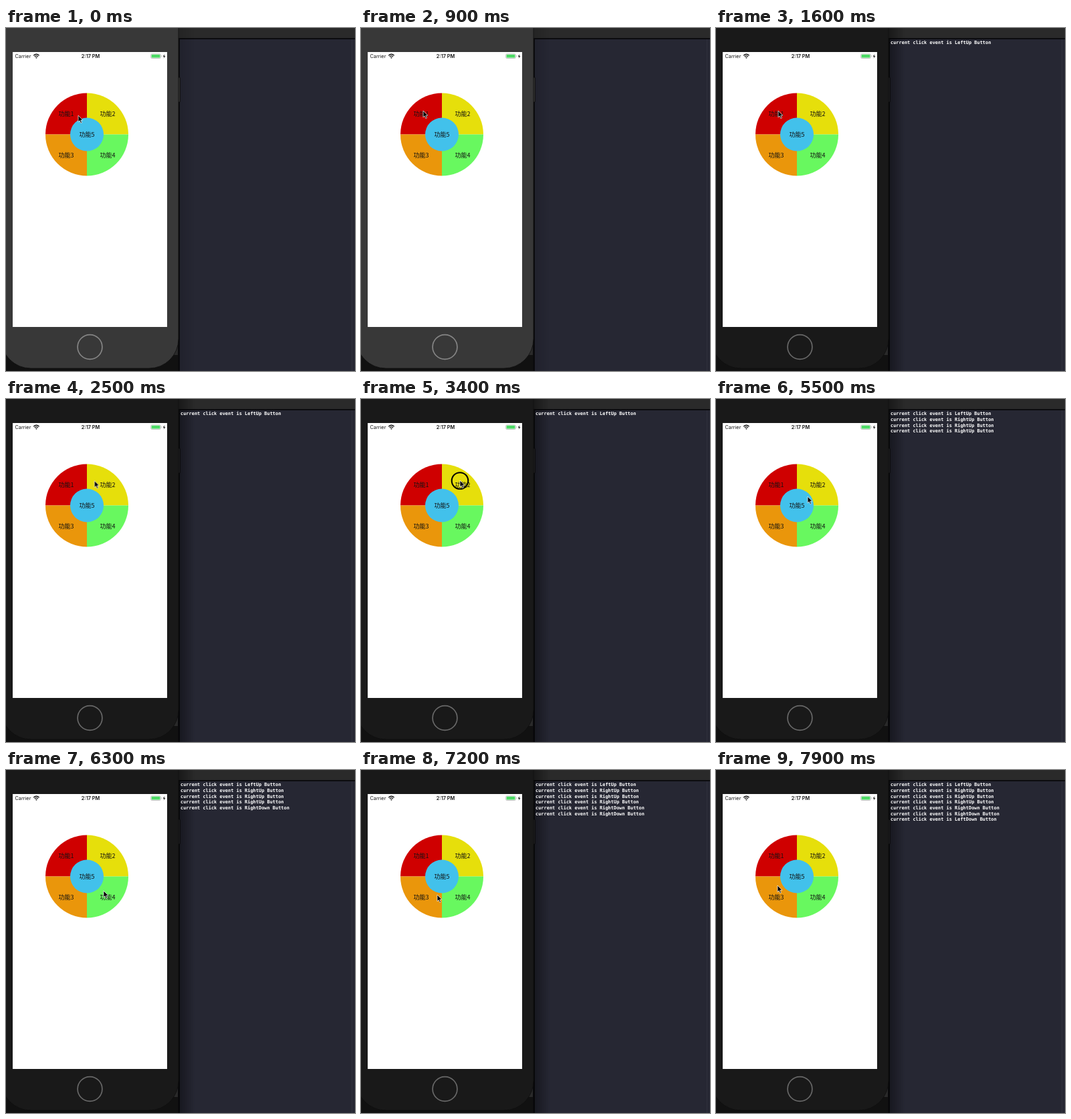
An HTML page that plays this animation: 522 px wide and 514 px high, repeating every 8 s.

```html
<!DOCTYPE html>
<html lang="zh-CN">
<head>
<meta charset="utf-8">
<title>Pie menu clicks</title>
<style>
  html, body { margin: 0; width: 100%; height: 100%; overflow: hidden; background: #262626; }
  svg { display: block; width: 522px; height: 514px; }

  .body, .button, .home, .shade, #visible rect, #ring { animation: 8s step-end infinite; }
  .body { animation-name: body; }
  .button { animation-name: button; }
  .home { animation-name: home; fill: none; stroke-width: 1.7px; }
  .shade { animation-name: shade; }
  #visible rect { animation-name: log; }
  #ring { animation-name: press; fill: none; stroke: #000; stroke-width: 2px; }
  #pointer { animation: move 8s linear infinite; }

  .status { font: 7.3px Inter, Roboto, sans-serif; fill: #111; }
  .labels { font: 9px "Noto Sans CJK SC", "Noto Sans CJK", sans-serif; text-anchor: middle; fill: #111; }
  .console { font: bold 6.95px "DejaVu Sans Mono", "Liberation Mono", monospace; fill: #fff; }

  /* The simulator window gains focus with the first click. */
  @keyframes body { 0% { fill: #383838; } 18.7%, 100% { fill: #191919; } }
  @keyframes button { 0% { fill: #303030; } 18.7%, 100% { fill: #1b1b1d; } }
  @keyframes home { 0% { stroke: #858585; } 18.7%, 100% { stroke: #686868; } }
  @keyframes shade { 0% { opacity: .35; } 18.7%, 100% { opacity: 1; } }

  @keyframes log {
    0% { transform: translateY(0); }
    19.9% { transform: translateY(8.67px); }
    44.9% { transform: translateY(17.34px); }
    59.9% { transform: translateY(26.01px); }
    66.2% { transform: translateY(34.68px); }
    77.4% { transform: translateY(43.35px); }
    86.2% { transform: translateY(52.02px); }
    94.9%, 100% { transform: translateY(60.69px); }
  }
  @keyframes press {
    0%, 19.9%, 46.2%, 61.2%, 67.4%, 78.7%, 87.4%, 96.2%, 100% { opacity: 0; }
    18.7%, 42.4%, 58.7%, 64.9%, 76.2%, 84.9%, 93.7% { opacity: 1; }
  }
  @keyframes move {
    0%, 1.25% { transform: translate(108px, 131px); }
    11.25%, 25% { transform: translate(93px, 124px); }
    33.75%, 47.5% { transform: translate(148px, 122px); }
    53.75% { transform: translate(139px, 134px); }
    56.25%, 61.25% { transform: translate(139px, 136px); }
    67.5% { transform: translate(138px, 143px); }
    68.75% { transform: translate(137px, 146px); }
    73.75%, 86.25% { transform: translate(146px, 181px); }
    90%, 91.25% { transform: translate(114px, 187px); }
    93.75%, 96.25% { transform: translate(97px, 181px); }
    98.75%, 100% { transform: translate(92px, 173px); }
  }
</style>
</head>
<body>
<svg viewBox="0 0 522 514">
  <defs>
    <linearGradient id="shadow">
      <stop offset="0" stop-color="#000" stop-opacity=".4"/>
      <stop offset="1" stop-color="#000" stop-opacity="0"/>
    </linearGradient>
    <clipPath id="visible"><rect x="260" y="-43" width="262" height="60.5"/></clipPath>
  </defs>

  <!-- Desktop and console -->
  <rect width="522" height="514" fill="#2a2a2a"/>
  <rect y="490" width="260" height="24" fill="#111"/>
  <rect x="257" y="15" width="265" height="499" fill="#0c0c0f"/>
  <rect x="260" y="17" width="262" height="497" fill="#262733"/>
  <rect x="517" y="17" width="1" height="497" fill="#30313d"/>
  <rect class="shade" x="258" width="24" height="514" fill="url(#shadow)"/>
  <g clip-path="url(#visible)">
    <g class="console" id="console"></g>
  </g>

  <!-- Phone -->
  <rect class="button" x="256" y="74" width="4.5" height="37" rx="1" stroke="#0a0a0a" stroke-width=".7"/>
  <rect class="body" x="-7" y="-46" width="265" height="556" rx="44" stroke="#101010" stroke-width=".8"/>
  <circle class="home" cx="125.5" cy="478" r="18.4"/>
  <rect x="10" y="36" width="231" height="412" fill="#fff"/>

  <!-- Status bar -->
  <g class="status">
    <text x="13.5" y="44.8">Carrier</text>
    <text x="126.5" y="44.8" text-anchor="middle" font-weight="600">2:17 PM</text>
    <g fill="none" stroke="#111" stroke-width="1.3">
      <path d="M41.2 41.2Q45.4 37.4 49.6 41.2"/>
      <path d="M42.8 43Q45.4 40.7 48 43"/>
    </g>
    <path d="M44 44.3Q45.4 43 46.8 44.3L45.4 45.8Z"/>
    <rect x="216.7" y="38.9" width="14.6" height="6.6" rx="1.6" fill="none" stroke="#999" stroke-width=".6"/>
    <rect x="217.6" y="39.8" width="12.8" height="4.8" rx=".9" fill="#4cd964"/>
    <path d="M232 41.1q1.3 1.1 0 2.2z" fill="#999"/>
    <path d="M237.3 39.2l-2.6 3.5h1.7l-.6 2.9 2.6-3.6h-1.7z"/>
  </g>

  <!-- Pie menu -->
  <g transform="translate(121 159.5)">
    <path d="M0 0H-62A62 62 0 0 1 0-62Z" fill="#cf0000"/>
    <path d="M0 0V-62A62 62 0 0 1 62 0Z" fill="#e6df0b"/>
    <path d="M0 0V62A62 62 0 0 1-62 0Z" fill="#ea960b"/>
    <path d="M0 0H62A62 62 0 0 1 0 62Z" fill="#68f85f"/>
    <circle r="25" fill="#42c1eb"/>
    <g class="labels">
      <text x="-31" y="-27.7">功能1</text>
      <text x="31" y="-27.7">功能2</text>
      <text x="-31" y="34.3">功能3</text>
      <text x="31" y="34.3">功能4</text>
      <text y="3.3">功能5</text>
    </g>
  </g>

  <g id="pointer">
    <circle id="ring" cy=".5" r="12.3"/>
    <path d="M0 0V9.8L2.2 7.8 3.8 11.5 5.5 10.8 3.9 7.1H7Z" fill="#000" stroke="#fff" stroke-width=".7" stroke-linejoin="round"/>
  </g>
</svg>
<script>
  const clicks = ["LeftUp", "RightUp", "RightUp", "RightUp", "RightDown", "RightDown", "LeftDown"];
  document.getElementById("console").innerHTML = clicks.map((name, i) =>
    `<text x="261" y="${24.2 + i * 8.67}">current click event is ${name} Button</text>`
  ).join("");
</script>
</body>
</html>
```
